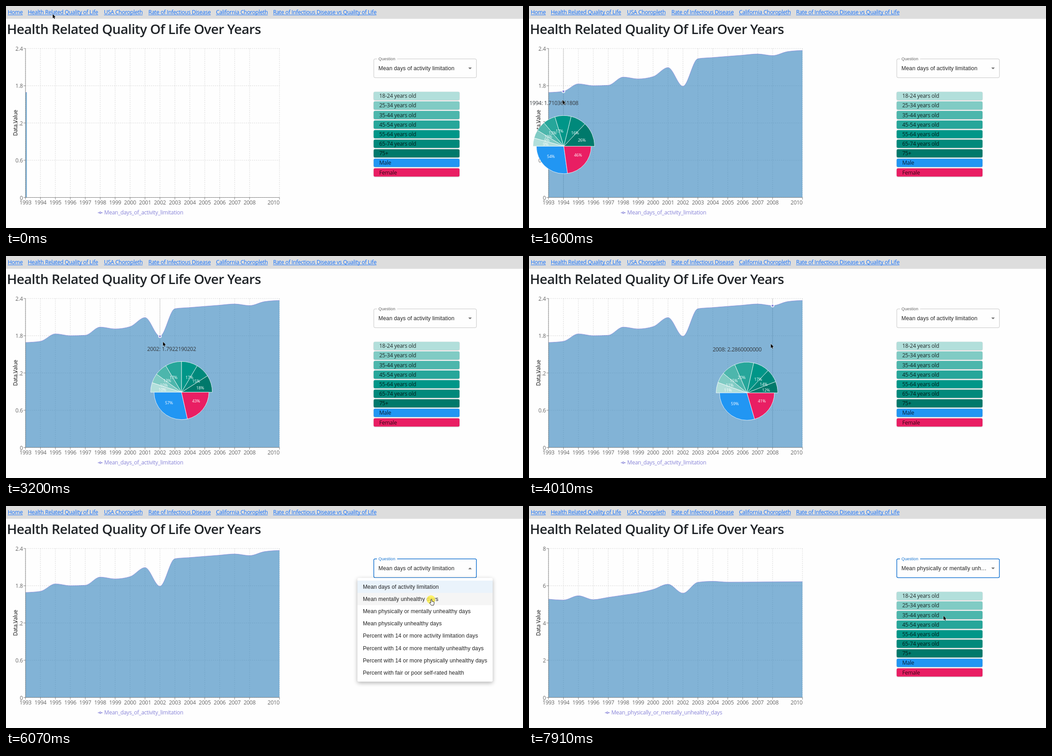
Recreate the animation shown at these times as an HTML page with a canvas. Size 1140 px wide and 491 px high, loop 8 s.

```html
<!DOCTYPE html>
<html lang="en">
<head>
<meta charset="utf-8">
<title>Health Related Quality Of Life Over Years</title>
<style>
  html, body { margin: 0; width: 100%; height: 100%; overflow: hidden; background: #fefefe; }
  canvas { display: block; }
</style>
</head>
<body>
<canvas id="stage" width="1140" height="491"></canvas>
<script>
const ctx = document.getElementById('stage').getContext('2d');
const LOOP = 8000;
const UI = '"Open Sans", "Noto Sans", sans-serif';
const FORM = '"Liberation Sans", Arial, sans-serif';

const LEFT = 43, RIGHT = 603, TOP = 94, BOTTOM = 423.5;
const YEARS = 18, HIDDEN = 16;
const STEP = (RIGHT - LEFT) / (YEARS - 1);
const PURPLE = '#8884d8', BLUE = '#1976d2', INK = '#212529';

const links = [
  ['Home', 4], ['Health Related Quality of Life', 48], ['USA Choropleth', 216],
  ['Rate of Infectious Disease', 314], ['California Choropleth', 463],
  ['Rate of Infectious Disease vs Quality of Life', 589]
];
// [label, colour, share in 1996, share in 2002]
const groups = [
  ['18-24 years old', '#b2dfdb', 9, 10], ['25-34 years old', '#80cbc4', 9, 10],
  ['35-44 years old', '#4db6ac', 11, 13], ['45-54 years old', '#26a69a', 14, 17],
  ['55-64 years old', '#009688', 17, 17], ['65-74 years old', '#00897b', 16, 15],
  ['75+', '#00796b', 24, 18], ['Male', '#2196f3', 55, 57], ['Female', '#e91e63', 45, 43]
];
const options = [
  'Mean days of activity limitation', 'Mean mentally unhealthy days',
  'Mean physically or mentally unhealthy days', 'Mean physically unhealthy days',
  'Percent with 14 or more activity limitation days',
  'Percent with 14 or more mentally unhealthy days',
  'Percent with 14 or more physically unhealthy days',
  'Percent with fair or poor self-rated health'
];

// A steady rise around 1996, a plateau from 2003, and bumps at single years.
function makeChart(max, rise, plateau, bumps) {
  const values = Array.from({ length: YEARS }, (_, i) =>
    (i < 10 ? rise[0] + rise[1] * (i - 3) : plateau[0] + plateau[1] * (i - 10)) + (bumps[i] || 0));
  return { max, values, ys: values.map(v => BOTTOM - v / max * (BOTTOM - TOP)) };
}
const charts = [
  makeChart(2.4, [1.8011661808, 0.0364], [2.236, 0.019],
    { 1: -0.018, 2: 0.066, 4: -0.03, 5: 0.066, 8: 0.11, 9: -0.2273471606, 15: -0.045 }),
  makeChart(3.6, [2.846, 0.052], [3.404, 0.0066],
    { 0: 0.07, 2: 0.085, 7: 0.04, 8: 0.2, 9: -0.066, 12: -0.085, 14: -0.06, 15: -0.065, 17: 0.05 }),
  makeChart(8, [5.256, 0.12], [6.185, 0.005],
    { 0: 0.385, 1: 0.216, 2: 0.327, 7: 0.065, 8: 0.226, 9: -0.376, 11: 0.05 })
];

// Moves: [start, end, x, y]
const pointerMoves = [
  [900, 1560, 74, 208], [1740, 2290, 149, 201], [2290, 3200, 346, 190], [3200, 4300, 600, 196],
  [4300, 4560, 624, 212], [4890, 5230, 943, 150], [5650, 5900, 938, 206], [6150, 6500, 944, 149],
  [6880, 7360, 914, 243]
];
const tipMoves = [[1740, 2290, 90, 207], [2290, 3200, 311, 205], [3200, 3850, 438, 206], [3850, 4210, 364, 207]];
const tipTime = [1560, 4290];
const menuTimes = [[5600, 6090], [6800, 7560]];
const clicks = menuTimes.flat().map(t => t - 90);

const within = (t, [from, to]) => t >= from && t < to;
const clamp = v => Math.max(0, Math.min(1, v));
const yearX = i => LEFT + i * STEP;

function follow(moves, t, x, y) {
  for (const [start, end, toX, toY] of moves) {
    const k = clamp((t - start) / (end - start));
    x += (toX - x) * k;
    y += (toY - y) * k;
  }
  return [x, y];
}

// CSS "ease" timing curve
function ease(p) {
  if (p <= 0 || p >= 1) return clamp(p);
  let lo = 0, hi = 1;
  for (let i = 0; i < 24; i++) {
    const s = (lo + hi) / 2;
    if (0.75 * s * (1 - s) + s ** 3 < p) lo = s; else hi = s;
  }
  return 0.3 * lo * (1 - lo) ** 2 + 3 * lo * lo * (1 - lo) + lo ** 3;
}

function setFont(size, family = UI, weight = 400) {
  ctx.font = `${weight} ${size}px ${family}`;
  ctx.letterSpacing = (family === UI ? -0.021 : 0.009) * size + 'px';
}

function text(str, x, y, color, align = 'left') {
  ctx.fillStyle = color;
  ctx.textAlign = align;
  ctx.fillText(str, x, y);
}

function line(x1, y1, x2, y2) {
  ctx.beginPath();
  ctx.moveTo(x1, y1);
  ctx.lineTo(x2, y2);
  ctx.stroke();
}

function disc(x, y, r) {
  ctx.beginPath();
  ctx.arc(x, y, r, 0, 7);
}

function raisedBox(x, y, w, h, color, shade, blur, dy) {
  ctx.save();
  ctx.shadowColor = shade;
  ctx.shadowBlur = blur;
  ctx.shadowOffsetY = dy;
  ctx.fillStyle = color;
  ctx.beginPath();
  ctx.roundRect(x, y, w, h, 3);
  ctx.fill();
  ctx.restore();
}

function drawHeader() {
  ctx.fillStyle = '#ddd';
  ctx.fillRect(0, 0, 1140, 28.4);
  setFont(12);
  for (const [label, x] of links) {
    text(label, x, 18, '#0d6efd');
    ctx.fillRect(x, 19.4, ctx.measureText(label).width, 0.9);
  }
  setFont(29.6, UI, 600);
  text('Health Related Quality Of Life Over Years', 2, 62, INK);
}

function drawGrid() {
  ctx.strokeStyle = '#ccc';
  ctx.lineWidth = 0.85;
  ctx.setLineDash([2.27, 2.27]);
  for (let i = 0; i < YEARS; i++) if (i !== HIDDEN) line(yearX(i), TOP, yearX(i), BOTTOM);
  for (let i = 0; i < 5; i++) {
    const y = TOP + i * (BOTTOM - TOP) / 4;
    line(LEFT, y, RIGHT, y);
  }
  ctx.setLineDash([]);
}

function drawAxes(max) {
  ctx.strokeStyle = '#666';
  ctx.lineWidth = 0.8;
  line(LEFT, TOP, LEFT, BOTTOM);
  line(LEFT, BOTTOM, RIGHT, BOTTOM);
  setFont(12);
  for (let i = 0; i < 5; i++) {
    const y = BOTTOM - i * (BOTTOM - TOP) / 4;
    line(LEFT - 4.5, y, LEFT, y);
    text(String(+(max * i / 4).toFixed(1)), 37, y + 5, '#666', 'right');
  }
  for (let i = 0; i < YEARS; i++) {
    if (i === HIDDEN) continue;
    line(yearX(i), BOTTOM, yearX(i), BOTTOM + 4.5);
    text(1993 + i, Math.min(yearX(i), 590), 438.5, '#666', 'center');
  }
  ctx.save();
  ctx.translate(25, 258.5);
  ctx.rotate(-Math.PI / 2);
  text('Data Value', 0, 0, '#111', 'center');
  ctx.restore();
}

// Monotone cubic through the yearly points
function traceCurve(ys) {
  const last = ys.length - 1, slope = [], h = STEP / 3;
  const d = i => (ys[i + 1] - ys[i]) / STEP;
  for (let i = 1; i < last; i++) {
    const a = d(i - 1), b = d(i);
    slope[i] = (Math.sign(a) + Math.sign(b)) * Math.min(Math.abs(a), Math.abs(b), Math.abs(a + b) / 4);
  }
  slope[0] = (3 * d(0) - slope[1]) / 2;
  slope[last] = (3 * d(last - 1) - slope[last - 1]) / 2;
  ctx.beginPath();
  ctx.moveTo(LEFT, ys[0]);
  for (let i = 1; i <= last; i++) {
    ctx.bezierCurveTo(yearX(i - 1) + h, ys[i - 1] + h * slope[i - 1],
      yearX(i) - h, ys[i] - h * slope[i], yearX(i), ys[i]);
  }
}

function drawArea(ys, reveal) {
  ctx.save();
  ctx.beginPath();
  ctx.rect(LEFT, TOP - 4, (RIGHT - LEFT) * reveal, BOTTOM - TOP + 4);
  ctx.clip();
  traceCurve(ys);
  ctx.lineTo(RIGHT, BOTTOM);
  ctx.lineTo(LEFT, BOTTOM);
  ctx.fillStyle = 'rgba(49,130,189,0.6)';
  ctx.fill();
  traceCurve(ys);
  ctx.strokeStyle = PURPLE;
  ctx.lineWidth = 0.8;
  ctx.stroke();
  ctx.restore();
}

function drawLegend(label) {
  setFont(12);
  const name = label.replaceAll(' ', '_');
  const x = 296.7 - (ctx.measureText(name).width + 14) / 2;
  ctx.strokeStyle = PURPLE;
  ctx.lineWidth = 1.3;
  line(x, 457.2, x + 3.5, 457.2);
  line(x + 7.1, 457.2, x + 10.6, 457.2);
  disc(x + 5.3, 457.2, 1.8);
  ctx.stroke();
  text(name, x + 14, 460.5, PURPLE);
}

// Slices run counter-clockwise from `angle` over half a turn.
function drawHalfPie(cx, cy, r, angle, slices) {
  const labels = [];
  const total = slices.reduce((sum, s) => sum + s.share, 0);
  ctx.strokeStyle = '#fff';
  ctx.lineWidth = 0.8;
  for (const { share, color } of slices) {
    const end = angle + Math.PI * share / total, mid = (angle + end) / 2;
    ctx.beginPath();
    ctx.moveTo(cx, cy);
    ctx.arc(cx, cy, r, -angle, -end, true);
    ctx.closePath();
    ctx.fillStyle = color;
    ctx.fill();
    ctx.stroke();
    labels.push([Math.round(share) + '%', Math.cos(mid) * r / 2, -Math.sin(mid) * r / 2]);
    angle = end;
  }
  setFont(9);
  for (const [str, dx, dy] of labels) text(str, cx + dx, cy + dy + 3.3, '#fff', dx > 0 ? 'left' : 'right');
}

function drawTooltip(t, year, value) {
  const [x, y] = follow(tipMoves, t, 1, 214);
  const cx = x + 75.7, cy = y + 96.3;
  const k = (year - 3) / 6;
  const slices = groups.map(([, color, from, to]) => ({ color, share: from + (to - from) * k }));
  setFont(12);
  text(`${1993 + year}: ${value.toFixed(10)}`, x, y + 4.5, '#33383d');
  drawHalfPie(cx, cy, 68, 0, slices.slice(0, 7).reverse());
  drawHalfPie(cx, cy, 60.5, Math.PI, slices.slice(7));
}

function drawActiveDot(x, y) {
  disc(x, y, 3);
  ctx.fillStyle = PURPLE;
  ctx.fill();
  ctx.strokeStyle = '#fff';
  ctx.lineWidth = 1.5;
  ctx.stroke();
}

function drawGroups() {
  setFont(12);
  groups.forEach(([label, color], i) => {
    const y = 189.8 + i * 21.15;
    raisedBox(810.7, y, 189.3, 18.2, color, 'rgba(0,0,0,0.28)', 2, 0.7);
    text(label, 823, y + 13.5, 'rgba(0,0,0,0.8)');
  });
}

function drawSelect(label, hover, focus, open) {
  ctx.strokeStyle = focus ? BLUE : hover ? 'rgba(0,0,0,0.87)' : 'rgba(0,0,0,0.25)';
  ctx.lineWidth = focus ? 1.5 : 0.9;
  ctx.beginPath();
  ctx.roundRect(811, 117, 226.3, 41.6, 3);
  ctx.stroke();
  ctx.fillStyle = '#fefefe';
  ctx.fillRect(818, 114, 44.5, 5);
  setFont(9.1, FORM);
  text('Question', 821.3, 120, focus ? BLUE : 'rgba(0,0,0,0.6)');
  setFont(12.1, FORM);
  let shown = label;
  while (ctx.measureText(shown).width > 190) shown = shown.replace(/.…?$/, '…');
  text(shown, 821.3, 142, 'rgba(0,0,0,0.87)');
  const dy = open ? -1.9 : 1.9;
  ctx.fillStyle = 'rgba(0,0,0,0.54)';
  ctx.beginPath();
  ctx.moveTo(1019.3, 138 - dy);
  ctx.lineTo(1027.1, 138 - dy);
  ctx.lineTo(1023.2, 138 + dy);
  ctx.fill();
}

function drawMenu(t, [open, close], selected, pointerY) {
  const fade = 220, rowHeight = 27.2;
  if (t < open || t > close + fade) return;
  const grow = ease((t - open) / 280);
  const hovered = Math.floor((pointerY - 165) / rowHeight);
  setFont(12.1, FORM);
  const w = Math.max(...options.map(o => ctx.measureText(o).width)) + 24;
  ctx.save();
  ctx.globalAlpha = grow * (1 - ease((t - close) / fade));
  ctx.translate(924, 159);
  ctx.scale(0.75 + 0.25 * grow, 0.56 + 0.44 * grow);
  raisedBox(-w / 2, 0, w, rowHeight * options.length + 12, '#fff', 'rgba(0,0,0,0.3)', 10, 3);
  options.forEach((option, i) => {
    const y = 6 + i * rowHeight;
    ctx.fillStyle = i === selected ? 'rgba(25,118,210,0.09)' : 'rgba(0,0,0,0.04)';
    if (i === selected || i === hovered) ctx.fillRect(-w / 2, y, w, rowHeight);
    text(option, 12 - w / 2, y + 17.6, 'rgba(0,0,0,0.87)');
  });
  ctx.restore();
}

const arrow = new Path2D('M0 0V9L2 7.3L3.4 10.4L4.9 9.8L3.5 6.7L6.3 6.4Z');
const hand = new Path2D('M-1.2 1Q0 -0.8 1.2 1V5L5 5.8Q6.4 6.2 6.2 8L5 13.4H-0.4L-4 8.6Q-4 7 -2.6 7.4L-1.2 8.8Z');

function drawPointer(t, x, y, isHand) {
  ctx.save();
  ctx.translate(x, y);
  for (const click of clicks) {
    if (!within(t, [click, click + 280])) continue;
    ctx.globalAlpha = 0.8 * clamp((click + 280 - t) / 100);
    ctx.fillStyle = '#fff04a';
    disc(-1, 1, 9.5);
    ctx.fill();
    ctx.globalAlpha = 1;
  }
  const shape = isHand ? hand : arrow;
  ctx.strokeStyle = isHand ? '#111' : '#fff';
  ctx.fillStyle = isHand ? '#fff' : '#000';
  ctx.lineWidth = 0.9;
  if (isHand) ctx.fill(shape);
  ctx.stroke(shape);
  if (!isHand) ctx.fill(shape);
  ctx.restore();
}

function draw(t) {
  const selected = menuTimes.filter(w => t >= w[1]).length;
  const open = menuTimes.some(w => within(t, w));
  const focus = t >= menuTimes[0][0];
  const { max, values, ys } = charts[selected];
  const [px, py] = follow(pointerMoves, t, 103, 18);
  const overSelect = within(px, [811, 1037]) && within(py, [117, 159]);
  const inspecting = within(t, tipTime);
  const year = Math.round((px - LEFT) / STEP);

  ctx.fillStyle = '#fefefe';
  ctx.fillRect(0, 0, 1140, 491);
  drawHeader();
  drawGrid();
  if (inspecting) {
    ctx.strokeStyle = '#bbb';
    ctx.lineWidth = 0.8;
    line(yearX(year), TOP, yearX(year), BOTTOM);
  }
  drawArea(ys, ease((t + 18) / 1575));
  drawAxes(max);
  drawLegend(options[selected]);
  if (inspecting) {
    drawActiveDot(yearX(year), ys[year]);
    drawTooltip(t, year, values[year]);
  }
  drawGroups();
  drawSelect(options[selected], overSelect, focus, open);
  for (const times of menuTimes) drawMenu(t, times, selected, py);
  drawPointer(t, px, py, open ? py > 165 : overSelect);
}

function frame() {
  draw(performance.now() % LOOP);
  requestAnimationFrame(frame);
}
frame();
</script>
</body>
</html>
```
